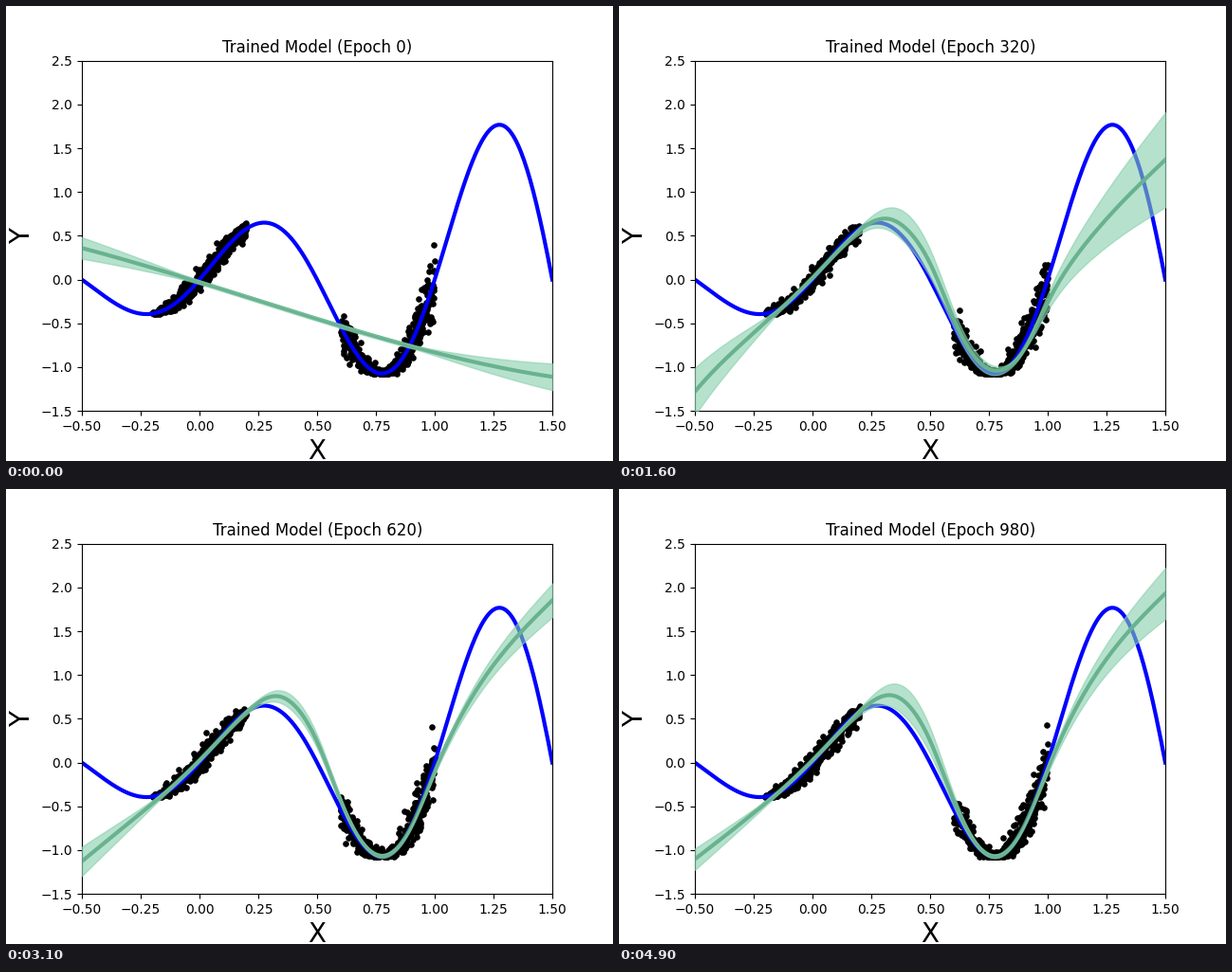
Recreate the animation shown at these times as a matplotlib script. Size 640 by 480 pixels, loop 5 s.

```python
import numpy as np
import matplotlib.pyplot as plt
from matplotlib.animation import FuncAnimation

FRAMES, INTERVAL, EPOCH_STEP = 50, 100, 20
POINTS_PER_SIDE, INPUT_NOISE = 500, 0.021
EARLY, SETTLED = 140, 320  # epochs where the training phases change

xs = np.linspace(-0.5, 1.5, 300)


def true_function(x):
    return 0.5 * np.exp(x) * np.sin(2 * np.pi * x)


def spline(x, points):
    """Natural cubic spline through a few (x, y) points."""
    px, py = np.array(points).T
    n = len(px)
    tail = np.column_stack([np.ones(n), px])
    system = np.block([[np.abs(px[:, None] - px) ** 3, tail],
                       [tail.T, np.zeros((2, 2))]])
    weights = np.linalg.solve(system, np.append(py, [0, 0]))
    basis = np.column_stack([np.abs(x[:, None] - px) ** 3, np.ones(len(x)), x])
    return basis @ weights


def bump(x, center, width):
    return np.exp(-((x - center) / width) ** 2)


# Shapes of the fitted curve: untrained, half trained, fully trained
untrained = np.polyval([0.09, -0.06, -0.8325, -0.03], xs)
half_trained = spline(xs, [(-0.5, -0.54), (-0.25, -0.25), (0.13, 0.07), (0.5, -0.43),
                           (0.8, -0.76), (1, -0.66), (1.5, -0.16)])
trained = spline(xs, [(-0.5, -1.1), (-0.25, -0.575), (0, 0.03), (0.2, 0.58),
                      (0.335, 0.77), (0.5, 0.25), (0.62, -0.56), (0.77, -1.07),
                      (0.9, -0.72), (1, -0.07), (1.25, 1.19), (1.5, 1.94)])

# What the settled curve still lacks; it decays exponentially
lag = (0.18 * np.exp(-(xs + 0.5) / 0.15) + 0.1 * bump(xs, 0.4, 0.15)
       - 0.06 * bump(xs, 0.77, 0.12) + 0.29 * (1 + np.tanh(5 * (xs - 1.07))))


def mean_curve(epoch):
    if epoch < EARLY:
        return untrained + (epoch / EARLY) ** 1.3 * (half_trained - untrained)
    settled = trained - np.exp(-max(epoch - SETTLED, 0) / 160) * lag
    progress = min((epoch - EARLY) / (SETTLED - EARLY), 1)
    return settled - (1 - progress) ** 3 * (settled - half_trained)


def spread_curve(epoch):
    """Uncertainty: fans out at both ends and bulges where data is missing."""
    def level(*values):
        return np.interp(epoch, [0, EARLY, SETTLED, 480, 620, 980], values)

    pinch = level(0, 0, -0.13, -0.13, -0.13, -0.13)
    left = level(0.12, 0.36, 0.27, 0.22, 0.165, 0.12) * np.clip(
        (pinch - xs) / (pinch + 0.5), 0, 1)
    gap = level(0, 0.26, 0.18, 0.14, 0.085, 0.17) * bump(
        xs, level(0.25, 0.25, 0.43, 0.43, 0.43, 0.43), 0.18)
    trough = level(0, 0.13, 0.05, 0, 0, 0) * bump(xs, 0.72, 0.13)
    right = level(0.15, 0.86, 0.54, 0.24, 0.19, 0.29) * np.clip((xs - 0.9) / 0.6, 0, 1)
    return np.hypot(left + gap + trough + right, 0.022)


def sample_data(frame):
    rng = np.random.default_rng(100 + frame)
    x = np.concatenate([rng.uniform(low, low + 0.4, POINTS_PER_SIDE)
                        for low in (-0.2, 0.6)])
    return np.column_stack([x, true_function(x + rng.normal(0, INPUT_NOISE, x.size))])


fig, ax = plt.subplots(figsize=(6.4, 4.8), dpi=100)
ax.set_xlim(-0.5, 1.5)
ax.set_ylim(-1.5, 2.5)
ax.set_xlabel("X", fontsize=20)
ax.set_ylabel("Y", fontsize=20)
title = ax.set_title("", x=0.501)
dots = ax.scatter([], [], s=14, color="black")
ax.plot(xs, true_function(xs), color="blue", linewidth=3)
mean_line, = ax.plot([], [], color="#408765", linewidth=3)
band = ax.fill_between(xs, xs, xs, color="#86cfac", alpha=0.6, zorder=5)


def update(frame):
    epoch = frame * EPOCH_STEP
    mean, spread = mean_curve(epoch), spread_curve(epoch)
    title.set_text(f"Trained Model (Epoch {epoch})")
    dots.set_offsets(sample_data(frame))
    mean_line.set_data(xs, mean)
    lower = np.column_stack([xs, mean - spread])
    upper = np.column_stack([xs, mean + spread])
    band.set_verts([np.vstack([lower, upper[::-1]])])
    return title, dots, mean_line, band


anim = FuncAnimation(fig, update, frames=FRAMES, interval=INTERVAL,
                     repeat=True, repeat_delay=0)
plt.show()
```
